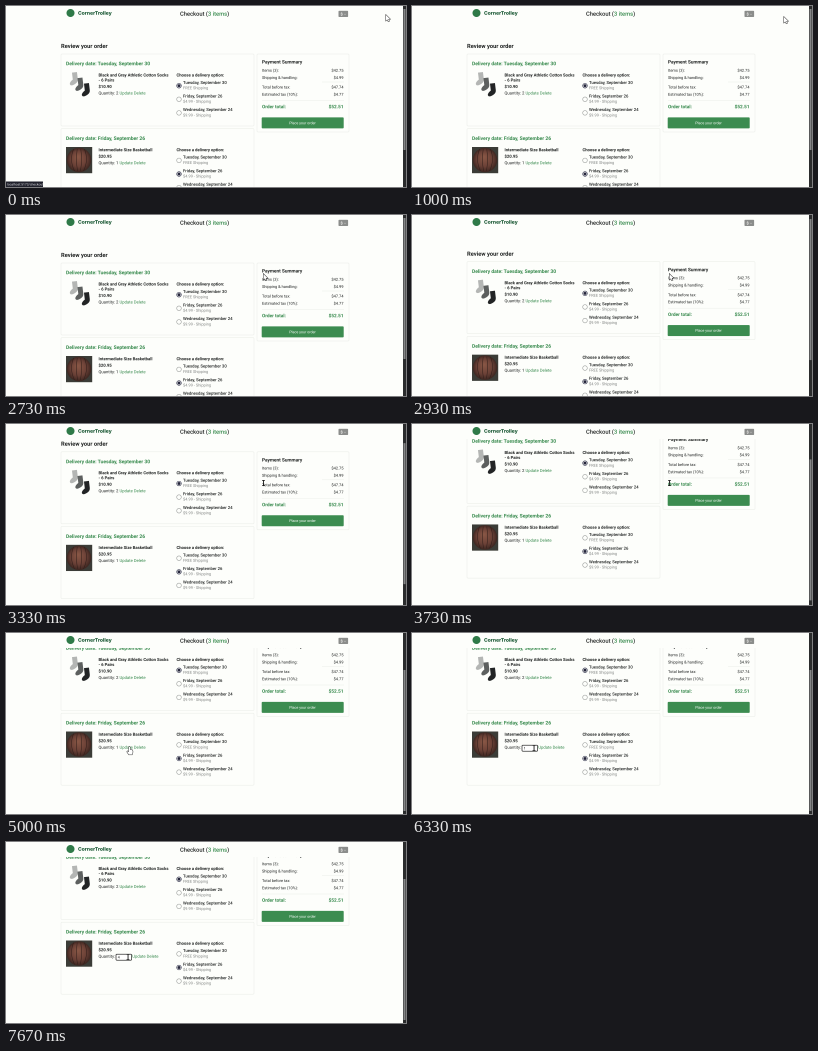
These frames come from a looping animation (400x181 px, 8 s). An HTML page with a canvas:

```html
<!DOCTYPE html>
<html lang="en">
<head>
<meta charset="utf-8">
<title>Checkout</title>
<style>
  html, body { margin: 0; width: 100%; height: 100%; overflow: hidden; background: #fdfefb; }
  canvas { display: block; width: 400px; height: 181px; }
</style>
</head>
<body>
<canvas id="stage"></canvas>
<script>
const W = 400, H = 181, LOOP = 8000, STEP = 1000 / 15;
const K = 0.2618; // page zoom: CSS pixels to stage pixels
const PAGE = '#fdfefb', INK = '#222524', GREY = '#858886', GREEN = '#378a4d', LINE = '#e9ece7';

const dpr = window.devicePixelRatio || 1;
const canvas = document.getElementById('stage');
canvas.width = W * dpr;
canvas.height = H * dpr;
const screen2d = canvas.getContext('2d');
screen2d.imageSmoothingQuality = 'high';

// The page is drawn large and scaled down, so small text stays even.
const SS = 4;
const page = document.createElement('canvas');
page.width = W * SS;
page.height = H * SS;
const ctx = page.getContext('2d');
ctx.textRendering = 'geometricPrecision';

// Keys are [time, value, value...]; values between keys are linear.
const scrollKeys = [[2800, 0], [2950, 1.5], [3330, 20], [3730, 40.5], [3870, 42.5]];
const cursorKeys = [
  [70, 380, 9], [470, 372, 11], [1934, 372, 11], [2000, 257.5, 59],
  [3740, 257.5, 59], [4000, 217, 87], [4334, 217, 87], [4400, 154, 116],
  [4600, 154, 116], [5000, 123.5, 114], [5200, 121.5, 114], [5400, 122, 115]
];

function track(keys, t) {
  if (t <= keys[0][0]) return keys[0].slice(1);
  for (let i = 1; i < keys.length; i++) {
    const a = keys[i - 1], b = keys[i];
    if (t < b[0]) {
      const p = (t - a[0]) / (b[0] - a[0]);
      return a.slice(1).map((v, j) => v + (b[j + 1] - v) * p);
    }
  }
  return keys[keys.length - 1].slice(1);
}

// y is the middle of the capitals; size is in page pixels. Returns the end x.
function text(str, x, y, size, weight = 400, color = INK, align = 'left', family = 'Roboto') {
  ctx.save();
  ctx.translate(x, y);
  ctx.scale(K, K);
  ctx.font = `${weight} ${size}px ${family}, sans-serif`;
  ctx.fillStyle = color;
  ctx.textAlign = align;
  ctx.fillText(str, 0, size * 0.355);
  const width = ctx.measureText(str).width * K;
  ctx.restore();
  return x + width;
}

function rect(x, y, w, h, fill) {
  ctx.fillStyle = fill;
  ctx.fillRect(x, y, w, h);
}

function roundRect(x, y, w, h, r, fill) {
  ctx.beginPath();
  ctx.roundRect(x, y, w, h, r);
  ctx.fillStyle = fill;
  ctx.fill();
}

function frame(x, y, w, h, r, color, width) {
  ctx.beginPath();
  ctx.roundRect(x, y, w, h, r);
  ctx.strokeStyle = color;
  ctx.lineWidth = width;
  ctx.stroke();
}

function disc(x, y, r, fill) {
  ctx.beginPath();
  ctx.arc(x, y, r, 0, Math.PI * 2);
  ctx.fillStyle = fill;
  ctx.fill();
}

function sock(x, y, color) {
  ctx.save();
  ctx.translate(x, y);
  ctx.rotate(-0.12);
  ctx.beginPath();
  ctx.moveTo(3, 0);
  ctx.lineTo(8, 0);
  ctx.lineTo(8, 7);
  ctx.quadraticCurveTo(8, 10, 5, 11.5);
  ctx.quadraticCurveTo(0, 14, -0.5, 11);
  ctx.quadraticCurveTo(-0.3, 9, 3, 7);
  ctx.closePath();
  ctx.fillStyle = color;
  ctx.fill();
  ctx.restore();
}

function socks() {
  sock(63, 67, '#b4b6b4');
  sock(68.5, 72.5, '#5d605f');
  sock(75, 78, '#222425');
}

function ball() {
  rect(60, 141, 26.2, 26.2, '#3b3c37');
  const g = ctx.createRadialGradient(72, 151, 1, 73, 154, 12.5);
  g.addColorStop(0, '#875645');
  g.addColorStop(0.6, '#6b4137');
  g.addColorStop(1, '#3a2520');
  disc(73, 154, 12.2, g);
  ctx.strokeStyle = '#2e1d19';
  ctx.lineWidth = 0.5;
  ctx.beginPath();
  for (const side of [-9, -3, 3, 9]) {
    ctx.moveTo(73 + side * 0.6, 143);
    ctx.quadraticCurveTo(73 + side * 1.1, 154, 73 + side * 0.5, 165);
  }
  ctx.stroke();
}

function radio(x, y, on) {
  ctx.beginPath();
  ctx.arc(x, y, 2.3, 0, Math.PI * 2);
  ctx.strokeStyle = on ? '#35374f' : '#a0a3a1';
  ctx.lineWidth = 0.6;
  ctx.stroke();
  if (on) disc(x, y, 1.5, '#25263c');
}

const options = [
  ['Tuesday, September 30', 'FREE Shipping'],
  ['Friday, September 26', '$4.99 - Shipping'],
  ['Wednesday, September 24', '$9.99 - Shipping']
];

function cartItem(top, item, typed) {
  frame(55, top, 193, 72, 1, LINE, 0.5);
  text('Delivery date: ' + options[item.pick][0], 60, top + 9.6, 19, 700, GREEN);

  let y = top + 21;
  item.name.forEach((row, i) => text(row, 92.5, y + i * 5, 16, 700));
  y += (item.name.length - 1) * 5 + 6.5;
  text(item.price, 92.5, y, 16, 700);
  y += 6.5;
  let x = text('Quantity: ', 92.5, y, 16);
  if (typed === null) {
    x = text(item.count + ' ', x, y, 16);
  } else {
    rect(110, y - 2, 15.6, 6, '#fff');
    frame(110, y - 2, 15.6, 6, 0.8, '#222', 0.7);
    text(typed, 111.7, y + 1, 14);
    x = 126.3;
  }
  x = text('Update ', x, y, 16, 400, GREEN);
  text('Delete', x, y, 16, 400, GREEN);

  text('Choose a delivery option:', 170.5, top + 21, 16, 700);
  options.forEach(([day, cost], i) => {
    const oy = top + 28.4 + i * 13.6;
    radio(173, oy + 3.3, i === item.pick);
    text(day, 177, oy, 16, 500);
    text(cost, 177, oy + 5.4, 15, 400, GREY);
  });
}

function summary() {
  frame(251, 48, 92, 78, 1, LINE, 0.5);
  text('Payment Summary', 256, 55.9, 18, 700);
  const rows = [
    ['Items (3):', '$42.75', 64.3], ['Shipping & handling:', '$4.99', 71.5],
    ['Total before tax:', '$47.74', 81.1], ['Estimated tax (10%):', '$4.77', 88.3]
  ];
  for (const [label, sum, y] of rows) {
    text(label, 256, y, 15);
    text(sum, 337.5, y, 15, 400, INK, 'right');
  }
  rect(316, 75.8, 22, 0.4, LINE);
  rect(256, 94.3, 82, 0.4, LINE);
  text('Order total:', 256, 100.7, 18, 700, GREEN);
  text('$52.51', 337.5, 100.7, 18, 700, GREEN, 'right');
  roundRect(255.7, 111.4, 82, 11, 1, '#3c8c50');
  text('Place your order', 296.5, 116.9, 14, 400, '#fff', 'center');
}

function header() {
  rect(0, 0, W, 15, PAGE);
  disc(64.5, 7, 4, '#2f7a48');
  text('CornerTrolley', 72, 7, 19, 800, '#1c5a36', 'left', 'Inter');
  let x = text('Checkout (', 174, 7.6, 22, 500);
  x = text('3 items', x, 7.6, 22, 500, GREEN);
  text(')', x, 7.6, 22, 500);
  roundRect(332.5, 4.8, 9.6, 6.2, 0.8, '#8b8d8b');
  text('$ ··', 337.3, 8, 15, 700, '#f4f4f2', 'center');
}

function scrollbar(scroll) {
  rect(397, 0, 3, H, '#2b2c2d');
  rect(397.5, 3 + scroll * 0.8, 2, 141, '#858687');
}

function polygon(points) {
  ctx.beginPath();
  points.forEach(([x, y]) => ctx.lineTo(x, y));
  ctx.closePath();
  ctx.lineWidth = 0.9;
  ctx.strokeStyle = '#222';
  ctx.stroke();
  ctx.fillStyle = '#fff';
  ctx.fill();
}

const shapes = {
  arrow() {
    polygon([[0, 0], [0, 5.6], [1.3, 4.5], [2.3, 6.5], [3.2, 6.1], [2.3, 4.1], [4, 4]]);
  },
  beam() {
    rect(-0.4, -2.8, 0.9, 5.6, '#1c1c1c');
    rect(-1.5, -3, 3, 0.7, '#1c1c1c');
    rect(-1.5, 2.3, 3, 0.7, '#1c1c1c');
  },
  hand() {
    polygon([[-0.6, 0], [0.5, 0], [0.6, 2.6], [3, 3.2], [3.3, 5], [2.5, 7.6],
      [-0.6, 7.6], [-2.5, 4.8], [-1.8, 4.1], [-0.6, 5]]);
  }
};

function cursor(t) {
  const [x, y] = track(cursorKeys, t);
  const overText = (t >= 2950 && t < 3900) || t >= 5400;
  const overLink = t >= 4800 && t < 5400;
  ctx.save();
  ctx.translate(x, y);
  shapes[overText ? 'beam' : overLink ? 'hand' : 'arrow']();
  ctx.restore();
}

const cart = [
  { name: ['Black and Gray Athletic Cotton Socks', '- 6 Pairs'], price: '$10.90', count: 2, pick: 0 },
  { name: ['Intermediate Size Basketball'], price: '$20.95', count: 1, pick: 1 }
];

function typedText(t) {
  if (t < 5400) return null;
  if (t < 7260) return '1';
  return t < 7460 ? '' : '4';
}

function draw(t) {
  const [scroll] = track(scrollKeys, t);
  ctx.setTransform(SS, 0, 0, SS, 0, 0);
  rect(0, 0, W, H, PAGE);

  ctx.save();
  ctx.translate(0, -scroll);
  text('Review your order', 55, 40, 22, 700);
  cartItem(48, cart[0], null);
  cartItem(122.7, cart[1], typedText(t));
  socks();
  ball();
  summary();
  ctx.restore();

  header();
  scrollbar(scroll);
  if (t < 300) {
    rect(0, 175.5, 37, 5.5, '#20212b');
    text('localhost:5173/checkout', 1, 178.3, 12.5, 400, '#e3e4e8');
  }
  cursor(t);
  screen2d.drawImage(page, 0, 0, canvas.width, canvas.height);
}

function tick() {
  const t = performance.now() % LOOP;
  draw(Math.floor((t + 4) / STEP) * STEP % LOOP);
  requestAnimationFrame(tick);
}
tick();
</script>
</body>
</html>
```
